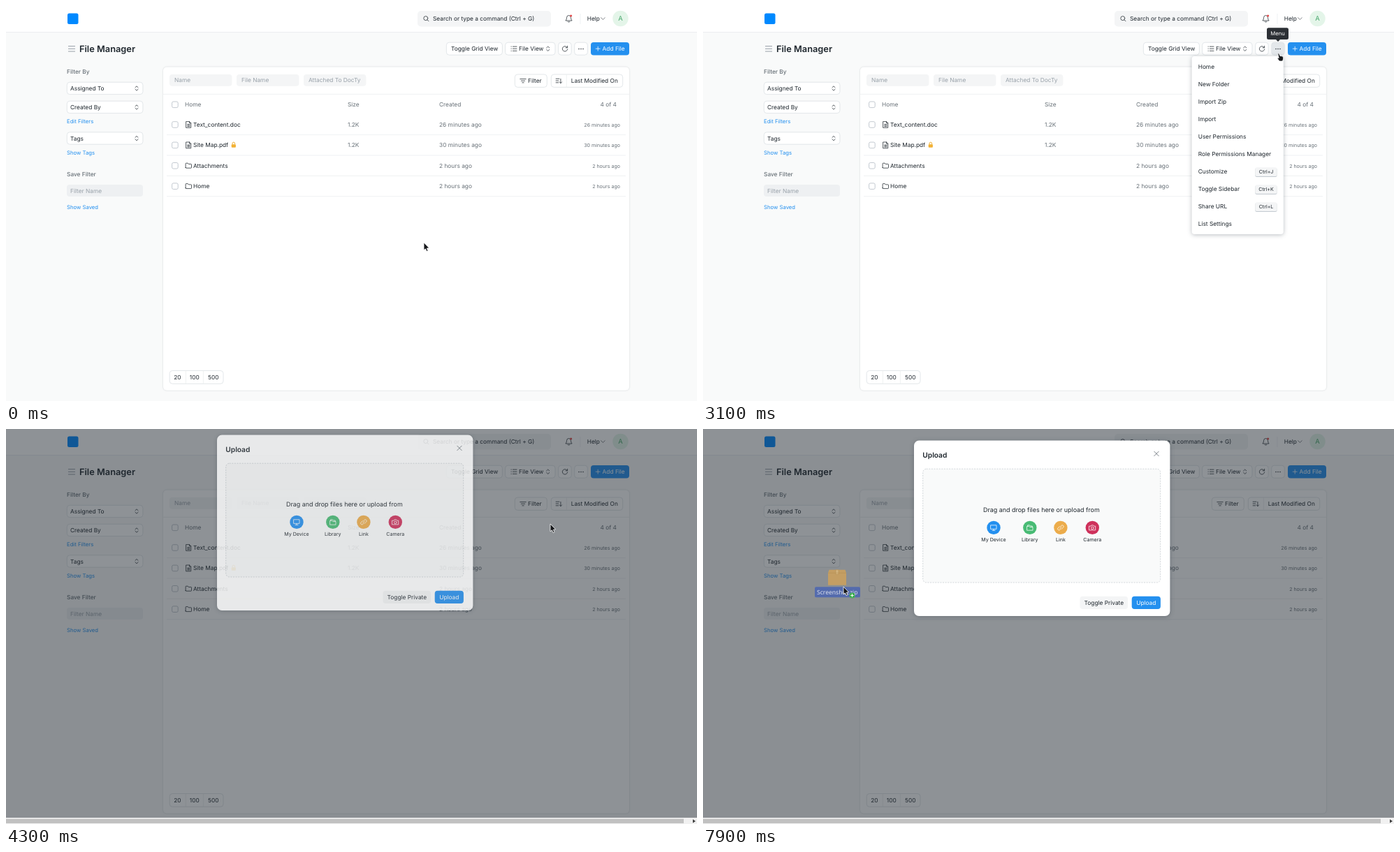
An HTML page that plays this animation: 989x566 px, repeating every 8000 ms.

```html
<!DOCTYPE html>
<html lang="en">
<head>
<meta charset="utf-8">
<title>File Manager</title>
<style>
html, body { margin: 0; width: 100%; height: 100%; overflow: hidden; background: #f9fafa; }
svg { display: block; }
text { font: 400 8.33px Inter, sans-serif; fill: #1f272e; text-rendering: geometricPrecision; white-space: pre; }
.title { font-size: 12.8px; font-weight: 600; }
.head { font-size: 10.2px; font-weight: 600; }
.label { font-weight: 500; fill: #687178; }
.link { font-size: 7.73px; fill: #2490ef; }
.mute { fill: #687178; }
.hint { fill: #98a1a9; }
.tiny { font-size: 7.08px; }
.mid { text-anchor: middle; }
.end { text-anchor: end; }
.white { fill: #fff; }
.sys { font-family: "Noto Sans", "Open Sans", sans-serif; }
.btn { fill: #fff; stroke: #dce1e5; stroke-width: .8; }
.blue { fill: #2490ef; }
.soft { fill: #f4f5f6; }
.icon { fill: none; stroke: #1f272e; stroke-width: .75; stroke-linecap: round; stroke-linejoin: round; }
.line { stroke: #ebeef0; stroke-width: .8; }
.card { fill: #fff; filter: drop-shadow(0 .4px 1.2px rgba(25, 39, 52, .18)); }
.pop { fill: #fff; filter: drop-shadow(0 1px 3px rgba(25, 39, 52, .3)); }
.pointer { fill: #16181b; stroke: #fff; stroke-width: .8; stroke-linejoin: round; }
</style>
</head>
<body>
<svg id="stage" width="989" height="566" viewBox="0 0 989 566"></svg>
<script>
const text = (x, y, s, cls = '') => `<text x="${x}" y="${y}" class="${cls}">${s}</text>`;
const box = (x, y, w, h, cls = 'btn', r = 4) =>
  `<rect x="${x}" y="${y}" width="${w}" height="${h}" rx="${r}" class="${cls}"/>`;
const icon = (x, y, d, extra = '') =>
  `<path class="icon" transform="translate(${x} ${y})" d="${d}" ${extra}/>`;
const rule = (x1, y1, x2, y2) => `<path class="line" d="M${x1} ${y1}L${x2} ${y2}"/>`;
const dot = (x, y, r, fill) => `<circle cx="${x}" cy="${y}" r="${r}" fill="${fill}"/>`;
const group = (id, body) => `<g id="${id}">${body}</g>`;

const UPDOWN = 'M-2-1.3L0-3.2L2-1.3M-2 1.3L0 3.2L2 1.3';
const DOC = 'M-3.3-4.4H1.2L3.4-2.2V4.4H-3.3ZM1.2-4.4V-2.2H3.4M-1.6-.4H1.7M-1.6 1.1H1.7M-1.6 2.6H1.7';
const FOLDER = 'M-4.2 2.6V-2.9Q-4.2-3.6-3.5-3.6H-1L0-2.3H3.5Q4.2-2.3 4.2-1.6V2.6Q4.2 3.4 3.5 3.4H-3.5Q-4.2 3.4-4.2 2.6Z';

const navbar = () => `
  <rect width="989" height="37.5" fill="#fff"/>
  <path d="M0 37.6H989" stroke="#e6e9ec" stroke-width=".8"/>
  ${box(88, 10.5, 15.5, 15.5, '', 2.5).replace('class=""', 'fill="#0089ff"')}
  ${box(589, 7, 191, 22.5, 'soft', 5)}
  ${icon(600.8, 17.6, 'M3 0A3 3 0 1 1-3 0A3 3 0 1 1 3 0M2.2 2.2L4.2 4.2')}
  ${text(611, 21, 'Search or type a command (Ctrl + G)')}
  ${icon(805.5, 18, 'M-4.3 2.7Q-3 1.5-3-1.2Q-3-4.5 0-4.5Q3-4.5 3-1.2Q3 1.5 4.3 2.7ZM-1.4 4.6Q0 5.6 1.4 4.6')}
  ${dot(808.6, 14, 1.6, '#e24c4c')}
  ${rule(822, 11, 822, 26)}
  ${text(831.8, 21, 'Help')}
  ${icon(854.4, 18, 'M-2.8-1.3L0 1.4L2.8-1.3', 'stroke-opacity=".75"')}
  ${dot(879.5, 18, 11.2, '#e4f5e9')}
  <text x="879.5" y="21.4" class="mid" style="font-size:9.4px;fill:#48a86c">A</text>`;

const toolbar = () => `
  ${icon(94, 61.3, 'M-4.6-3.7H4.6M-4.6 0H4.6M-4.6 3.7H4.6', 'style="stroke:#77828c"')}
  ${text(105, 65.6, 'File Manager', 'title')}
  ${box(630.4, 52.2, 80, 18)}${text(637, 64.2, 'Toggle Grid View')}
  ${box(714.6, 52.2, 71.4, 18)}
  ${icon(727, 61.2, 'M-4-3.1H-3.6M-4 0H-3.6M-4 3.1H-3.6M-1.6-3.1H4M-1.6 0H4M-1.6 3.1H4')}
  ${text(734, 64.2, 'File View')}${icon(775.7, 61.2, UPDOWN)}
  ${box(790.6, 52.2, 18.6, 18)}
  ${icon(800, 61.3, 'M3.3-1.7A3.7 3.7 0 1 0 3.7.6M3.6-4V-1.5H1.2')}
  ${box(813.7, 52.2, 18.6, 18).replace('<rect', '<rect id="dots"')}
  ${[820, 823, 826].map(x => dot(x, 61.6, .75, '#1f272e')).join('')}
  ${box(837, 52, 55, 18.4, 'blue')}
  ${icon(847.2, 61.2, 'M-3 0H3M0-3V3', 'style="stroke:#fff"')}
  ${text(853.6, 64.2, 'Add File', 'white')}`;

const select = (y, s) =>
  box(87.3, y - 8.8, 108.6, 17.4) + text(92, y + 3, s) + icon(187, y, UPDOWN);

const sidebar = () => `
  ${text(87, 97, 'Filter By', 'label')}
  ${select(118, 'Assigned To')}${select(145, 'Created By')}
  ${text(87, 168, 'Edit Filters', 'link')}
  ${select(189.6, 'Tags')}
  ${text(87, 212.8, 'Show Tags', 'link')}
  ${text(87, 243.6, 'Save Filter', 'label')}
  <rect x="87" y="256" width="109" height="17" rx="4" fill="#eef0f2"/>
  ${text(92, 267.8, 'Filter Name', 'hint')}
  ${text(87, 291.2, 'Show Saved', 'link')}`;

const check = y => `<rect x="237.6" y="${y - 4.3}" width="8.6" height="8.6" rx="2" fill="#fff" stroke="#b4bcc4" stroke-width=".8"/>`;

const row = ([name, size, age], i) => {
  const y = 170 + i * 29.4;
  return check(y) + icon(261.3, y, size ? DOC : FOLDER) + text(268, y + 2.9, name) +
    text(489, y + 2.9, size, 'mute') + text(620, y + 2.9, age, 'mute') +
    text(879, y + 2.7, age, 'mute tiny end') + rule(230, y + 14.6, 887, y + 14.6);
};

const list = () => `
  ${box(225, 87.5, 667, 463.3, 'card', 5)}
  ${[[234, 'Name'], [330, 'File Name'], [426, 'Attached To DocTy']].map(([x, s]) =>
    box(x, 98, 89.4, 16.8, 'soft') + text(x + 7, 109.4, s, 'hint')).join('')}
  ${box(728.3, 98, 46, 18.4)}${icon(740, 107.2, 'M-4.2-2.6H4.2M-2.7 0H2.7M-1.2 2.6H1.2')}
  ${text(747, 110.2, 'Filter')}
  ${box(780.3, 98, 102.4, 18.4)}${rule(802.3, 98, 802.3, 116.4)}
  ${icon(791.3, 107.2, 'M-4.2-3H.6M-4.2-.2H-.6M-4.2 2.6H-.6M2.6-2.8V3.4M.9 1.7L2.6 3.4L4.3 1.7')}
  ${text(808.7, 110.2, 'Last Modified On')}
  ${rule(225, 126.4, 892, 126.4)}
  ${check(141.3)}
  ${text(256, 144, 'Home', 'mute')}${text(489, 144, 'Size', 'mute')}
  ${text(620, 144, 'Created', 'mute')}${text(874, 144, '4 of 4', 'mute end')}
  ${[['Text_content.doc', '1.2K', '26 minutes ago'], ['Site Map.pdf', '1.2K', '30 minutes ago'],
    ['Attachments', '', '2 hours ago'], ['Home', '', '2 hours ago']].map(row).join('')}
  <path d="M324-.5V-2A1.8 1.8 0 0 1 327.6-2V-.5" transform="translate(0 199)" fill="none" stroke="#f2b134" stroke-width="1"/>
  <rect x="322.7" y="198.2" width="6.2" height="4.6" rx="1" fill="#f2b134"/>
  ${box(234.2, 522.5, 76.8, 18.8)}${rule(257.4, 522.5, 257.4, 541.3)}${rule(282.4, 522.5, 282.4, 541.3)}
  ${text(245.4, 535, '20', 'mid')}${text(269.8, 535, '100', 'mid')}${text(296.7, 535, '500', 'mid')}`;

const menu = () => {
  const items = ['Home', 'New Folder', 'Import Zip', 'Import', 'User Permissions', 'Role Permissions Manager',
    'Customize', 'Toggle Sidebar', 'Share URL', 'List Settings'];
  const keys = { 6: 'J', 7: 'K', 8: 'L' };
  return box(699.6, 72, 131.2, 255, 'pop') +
    '<rect id="hot" x="702" y="124.6" width="126" height="25" rx="3.5" fill="#687178"/>' +
    items.map((s, i) => {
      const y = 87.3 + i * 25.03;
      const key = keys[i] ? `<rect x="790.3" y="${y - 5.6}" width="31.2" height="13" rx="2.5" fill="#c3cad0"/>` +
        box(790.3, y - 6.2, 31.2, 12.6, 'soft', 2.5) + text(806, y + 2.7, 'Ctrl+' + keys[i], 'tiny mid') : '';
      return `<g id="item${i}">${text(708.7, y + 2.9, s)}</g>` + key;
    }).join('');
};

const tooltip = () => `
  <path d="M809.5 31.2H835.5Q838 31.2 838 33.7V45.5Q838 48 835.5 48H826L823 51L820 48H809.5Q807 48 807 45.5V33.7Q807 31.2 809.5 31.2Z" fill="#2c3035"/>
  <text x="822.6" y="42.4" class="mid white" style="font-size:7.73px">Menu</text>`;

const dialog = () => {
  const sources = [
    [416, 'My Device', '#2490ef', 'M-4-3.6H4V2H-4ZM-2 4H2M0 2V4'],
    [467.8, 'Library', '#48bb74', 'M-4.2 3.4V-2H-1L0-.8H4.2V3.4ZM-3.2-2V-3.6H-.4L.6-2.4H3.4V-.8'],
    [511.9, 'Link', '#ecac4b', 'M-.6-1.4L1-3A1.9 1.9 0 0 1 3.7-.3L1.7 1.6M.6 1.4L-1 3A1.9 1.9 0 0 1-3.7.3L-1.7-1.6M-1.2 1.2L1.2-1.2'],
    [557.3, 'Camera', '#ce315b', 'M-4.4-2.2H-2.2L-1.3-3.5H1.3L2.2-2.2H4.4V3.5H-4.4ZM1.8.5A1.8 1.8 0 1 1-1.8.5A1.8 1.8 0 1 1 1.8.5']];
  return `
  ${box(302, 16.6, 366.4, 251.4, 'pop', 7)}
  ${text(314.3, 40.9, 'Upload', 'head')}
  ${icon(649, 35.4, 'M-3.2-3.2L3.2 3.2M3.2-3.2L-3.2 3.2', 'style="stroke:#505a62"')}
  <rect x="314.7" y="57.2" width="340" height="162.8" rx="5" fill="#f9fafa" stroke="#c0c6cc" stroke-width=".7" stroke-dasharray="2 1.6"/>
  <text x="484.4" y="118.6" class="mid" style="font-size:8.93px">Drag and drop files here or upload from</text>
  ${sources.map(([x, s, fill, d]) => dot(x, 141.4, 9.7, fill) +
    icon(x, 141.4, d, 'style="stroke:#fff"') + text(x, 160.8, s, 'tiny mid')).join('')}
  ${box(539.5, 239.8, 68.6, 18.2, 'soft')}${text(545.6, 251.9, 'Toggle Private')}
  ${box(613.7, 239.8, 41.2, 18.2, 'blue')}${text(634.3, 251.9, 'Upload', 'white mid')}`;
};

const scrollbar = () => `
  <rect y="557" width="989" height="9" fill="#f1f1f1"/>
  <rect y="558.6" width="970" height="6.4" fill="#c1c1c1"/>
  <path d="M983 559.2L987 561.9L983 564.6Z" fill="#404040"/>`;

const status = () => `
  <path d="M0 553.4H132Q134.6 553.4 134.6 556V566H0Z" fill="#08090a"/>
  <text x="0" y="562.9" class="sys white" style="font-size:8.05px">calhost:8010/app/file/view/home#</text>`;

// Dragged archive, placed by the top left corner of its label
const parcel = () => `
  <g opacity=".92">
    <path d="M20.5-24.5H43.5L45-20V-2.5H19V-20Z" fill="#c9a05f"/>
    <path d="M19-20H45M30-24.5H34V-18H30Z" fill="#d8b67c" stroke="#b58b4b" stroke-width=".5"/>
    <rect width="65" height="15" rx="2" fill="#5068b0"/>
    <text x="32.3" y="10.6" class="sys mid" style="font-size:8.55px;fill:#e3e8f4">Screenshot.zip</text>
  </g>`;

const pointers = () => `
  <path id="arrow" class="pointer" d="M0 0V10.8L2.4 8.9L4.1 12.6L6 11.7L4.4 8.2L7.6 7.8Z"/>
  <path id="hand" class="pointer" d="M-1.2.8Q-.9-.6.4 0L2 3.6L5 3.8Q6.6 4.4 6.6 6.6Q6.6 9 5.4 11H.9Q-.6 9-1.8 7.2Q-1.8 5.8-.3 6.4L.2 6.6Z"/>
  <g id="plus">${dot(12.5, 12.5, 4, '#3fae52')}
    <path d="M10.3 12.5H14.7M12.5 10.3V14.7" stroke="#fff" stroke-width="1"/></g>`;

document.getElementById('stage').innerHTML =
  navbar() + toolbar() + sidebar() + list() +
  group('menu', menu()) + group('tooltip', tooltip()) +
  '<rect id="shade" width="989" height="566" fill="#1f272e"/>' +
  group('dialog', dialog()) + group('scrollbar', scrollbar()) + group('status', status()) +
  group('parcel', parcel()) + group('cursor', pointers());

const el = id => document.getElementById(id);
const show = (id, on) => { el(id).style.display = on ? '' : 'none'; };
const move = (id, [x, y]) => el(id).setAttribute('transform', `translate(${x.toFixed(2)} ${y.toFixed(2)})`);

// Way points: time, x, y
const cursorPath = [
  [400, 598, 339], [700, 863, 255], [1200, 310, 176], [1300, 271, 188], [1400, 345, 175],
  [1800, 866, 90], [2100, 827, 65], [2600, 827, 65], [3100, 824, 68], [3500, 779, 136],
  [4600, 779, 136], [4700, 778.4, 136], [4800, 778.4, 136], [5400, 519, 186], [5700, 345, 213],
  [5800, 255, 216], [6000, 63, 194], [7299, 63, 194], [7300, 25, 237], [7900, 201, 226]];
const parcelPath = [[7300, -58, 239.3], [7900, 160, 226.3]];

function at(path, t) {
  const i = path.findIndex(p => p[0] > t);
  if (i === 0) return path[0].slice(1);
  if (i < 0) return path[path.length - 1].slice(1);
  const [a, b] = [path[i - 1], path[i]];
  const k = (t - a[0]) / (b[0] - a[0]);
  return [a[1] + (b[1] - a[1]) * k, a[2] + (b[2] - a[2]) * k];
}

const LOOP = 8000, STEP = 100;

function render(now) {
  const t = Math.floor(now % LOOP / STEP) * STEP;
  const during = (from, to = LOOP) => t >= from && t < to;
  const [x, y] = at(cursorPath, t);
  const inside = (l, top, r, bottom) => x > l && x < r && y > top && y < bottom;

  el('dots').style.fill = during(2100, 3600) ? '#e4e8eb' : '';
  show('menu', during(2400, 4000));
  show('hot', during(3600));
  el('item2').firstChild.style.fill = during(3600) ? '#fff' : '';
  show('tooltip', during(2700, 4000));
  show('status', during(3600, 4300));

  show('shade', during(4000));
  el('shade').style.opacity = t < 4100 ? .45 : .5;
  show('scrollbar', during(4000));
  show('dialog', during(4300));
  el('dialog').style.opacity = t < 4400 ? .8 : 1;
  move('dialog', [0, t < 4400 ? -8 : 0]);

  const dragging = during(7300);
  const hand = !dragging && (during(2000, 4000) ? inside(813, 52, 833, 71) : during(4400) && inside(314, 57, 655, 220));
  show('cursor', !during(6100, 7300));
  show('hand', hand);
  show('arrow', !hand);
  show('plus', dragging);
  show('parcel', dragging);
  move('cursor', [x, y]);
  move('parcel', at(parcelPath, t));
}

const start = performance.now();
function tick() {
  render(performance.now() - start);
  requestAnimationFrame(tick);
}
tick();
</script>
</body>
</html>
```
